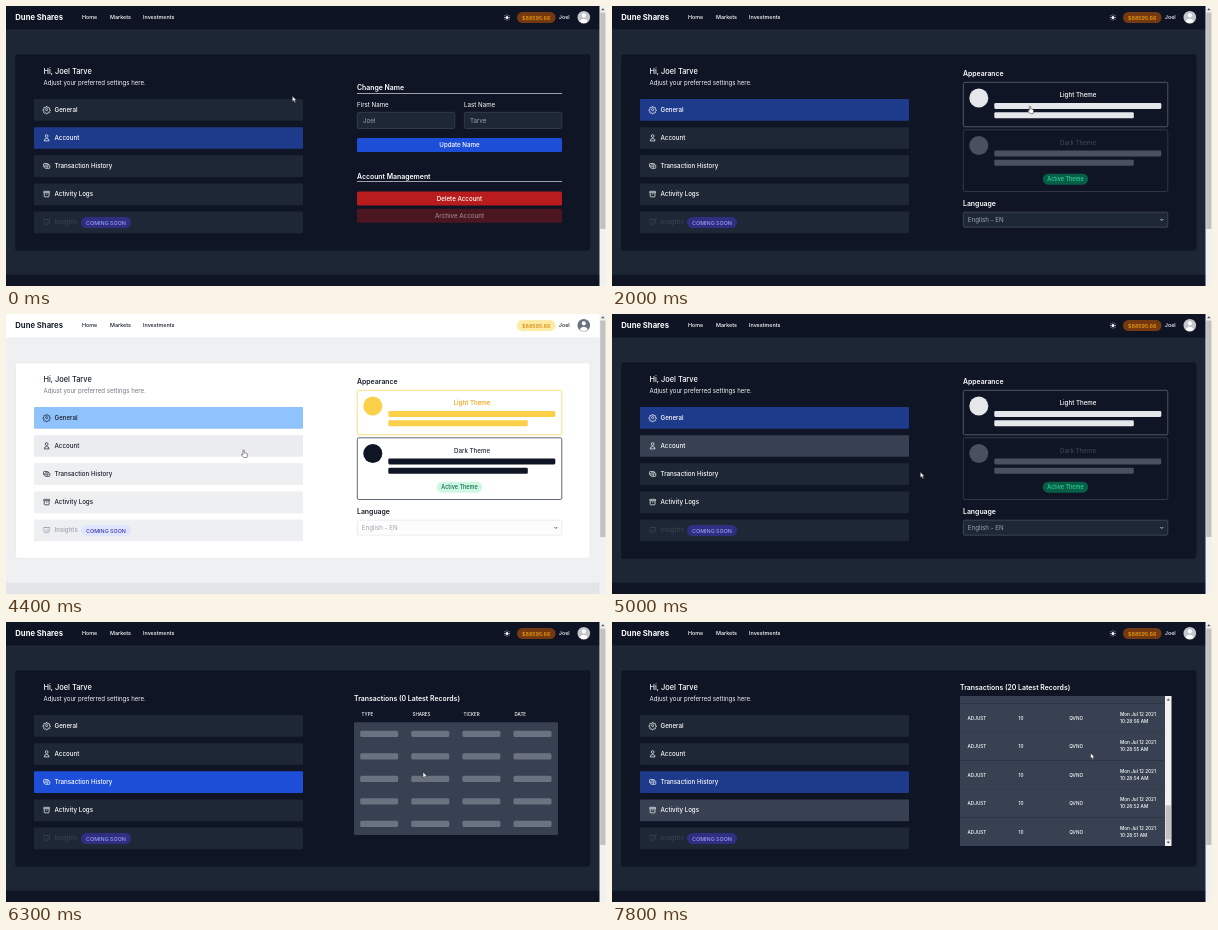
Write an HTML page that moves like this. It is 600 px wide and 280 px high and loops after 8000 ms.

```html
<!DOCTYPE html>
<html lang="en">
<head>
<meta charset="utf-8">
<title>Account settings</title>
<style>
  html, body { margin: 0; width: 100%; height: 100%; overflow: hidden; }
  svg { display: block; width: 600px; height: 280px; font-family: Inter, sans-serif; }
</style>
</head>
<body>
<svg id="stage" viewBox="0 0 600 280"></svg>
<script>
const LOOP = 8000;
const TO_GENERAL = 480, TO_HISTORY = 5480, LOADED = 6380;
const TO_LIGHT = 2600, TO_DARK = 4400, FADE = 400;

// Each entry: dark colour, light colour.
const palette = {
  page: ['#1d2635', '#eff0f2'], bar: ['#0e1423', '#ffffff'], panel: ['#0f1524', '#ffffff'],
  edge: ['#0f1524', '#e3e5e8'], foot: ['#0f1524', '#e2e4e8'],
  text: ['#ffffff', '#161d2b'], sub: ['#f3f4f6', '#737984'], faint: ['#374151', '#9ca3af'],
  row: ['#1e2735', '#eeeff1'], rowHover: ['#374151', '#e5e7eb'],
  active: ['#1e3a8a', '#90c2fb'], activeHover: ['#1d4ed8', '#60a5fa'],
  cash: ['#74390f', '#fdeaa5'], cashText: ['#f8a50c', '#d98206'], avatar: ['#c3c6cb', '#6b7280'],
  soon: ['#302e81', '#dfe5fe'], soonText: ['#939df6', '#3f3ba8'],
  sun: ['#e5e7eb', '#e9ebee'], sunText: ['#ffffff', '#eda313'], sunEdge: ['#6b7280', '#fcd34d'],
  sunFill: ['#e5e7eb', '#fcd049'],
  moonText: ['#3b4250', '#1f2937'], moonFill: ['#4a505e', '#101525'], moonEdge: ['#3f4655', '#1f2937'],
  badge: ['#065f46', '#cff8e3'], badgeText: ['#34d399', '#0b654b'],
  field: ['#1e2735', '#fdfdfd'], fieldEdge: ['#4b5563', '#e5e7eb'], hint: ['#9ca3af', '#9ca3af']
};

const rect = (x, y, w, h, fill, r = 0, more = '') =>
  `<rect x="${x}" y="${y}" width="${w}" height="${h}" rx="${r}" fill="${fill}" ${more}/>`;
const text = (x, y, s, size = 6.2, fill = 'var(--text)', weight = 400, more = '') =>
  `<text x="${x}" y="${y}" font-size="${size}" font-weight="${weight}" fill="${fill}" ${more}>${s}</text>`;
const mid = (x, y, s, size, fill, weight = 500) => text(x, y, s, size, fill, weight, 'text-anchor="middle"');
const heading = (x, y, s) => text(x, y, s, 6.9, 'var(--text)', 600);
const group = (id, body) => `<g id="${id}">${body}</g>`;
const stroke = (color, width = .7) => `stroke="${color}" stroke-width="${width}"`;
const times = (n, f) => Array.from({ length: n }, (_, i) => f(i)).join('');

const columns = ['TYPE', 'SHARES', 'TICKER', 'DATE'];
const columnHeads = y => columns.map((c, i) => text(355.5 + 51 * i, y, c, 4.5, 'var(--text)', 500)).join('');

const rows = [
  ['General', 'M9 12a3 3 0 106 0 3 3 0 10-6 0M10.5 3h3l.7 2.6 2.3 1 2.4-1.4 2 2.1-1.3 2.4.9 2.3 2.5.7v2l-2.5.8-1 2.2 1.4 2.4-2.1 2-2.4-1.3-2.2.9-.8 2.3h-2.8l-.8-2.4-2.2-.9-2.4 1.3-2.1-2 1.4-2.4-1-2.2L1 14.700v-2l2.600-.7.9-2.300-1.300-2.400 2-2.100 2.400 1.400 2.300-1z'],
  ['Account', 'M16 7a4 4 0 11-8 0 4 4 0 018 0zM12 14a7 7 0 00-7 7h14a7 7 0 00-7-7z'],
  ['Transaction History', 'M17 9V7a2 2 0 00-2-2H5a2 2 0 00-2 2v6a2 2 0 002 2h2m2 4h10a2 2 0 002-2v-6a2 2 0 00-2-2H9a2 2 0 00-2 2v6a2 2 0 002 2zm7-5a2 2 0 11-4 0 2 2 0 014 0z'],
  ['Activity Logs', 'M5 8h14M5 8a2 2 0 110-4h14a2 2 0 110 4M5 8v10a2 2 0 002 2h10a2 2 0 002-2V8m-9 4h4'],
  ['Insights', 'M8 13v-1m4 1v-3m4 3V8M8 21l4-4 4 4M3 4h18M4 4h16v12a1 1 0 01-1 1H5a1 1 0 01-1-1V4z']
];

const menu = rows.map(([label, icon], i) => {
  const y = 93 + 28.15 * i, color = i < 4 ? 'var(--text)' : 'var(--faint)';
  return rect(28, y, 269, 21.7, 'var(--row)', 1, `id="row${i}"`) +
    `<path transform="translate(36.500 ${y + 6.5}) scale(.345)" d="${icon}" fill="none" ${stroke(color, 2)} stroke-linejoin="round"/>` +
    text(48.5, y + 12.8, label, 6.2, color, 500);
}).join('') + rect(75, 211, 50, 11, 'var(--soon)', 5.5) + mid(100, 218.5, 'COMING SOON', 5.4, 'var(--soonText)');

const header = rect(0, 0, 594, 23.5, 'var(--bar)') +
  text(9.3, 14.2, 'Dune Shares', 7.7, 'var(--text)', 700) +
  [[76, 'Home'], [104, 'Markets'], [137, 'Investments']].map(([x, s]) => text(x, 13.4, s, 5.4, 'var(--text)', 500)).join('') +
  group('sunIcon', '<circle cx="501" cy="11.5" r="1.5" fill="#fff"/>' +
    times(8, i => `<path d="M501 8.500v.9" ${stroke('#fff')} transform="rotate(${45 * i} 501 11.500)"/>`)) +
  group('moonIcon', '<path d="M503.600 12.500a2.900 2.900 0 01-3.600-3.600 2.900 2.900 0 103.600 3.600z" fill="#1f2937"/>') +
  rect(511, 6, 38.5, 11, 'var(--cash)', 5.5) + mid(530.2, 13.5, '$88595.66', 5.4, 'var(--cashText)') +
  text(552.8, 13.4, 'Joel', 5.4, 'var(--text)', 500) +
  '<circle cx="577.800" cy="11.300" r="6.300" fill="var(--avatar)"/>' +
  '<path d="M575.700 9.300a2.100 2.100 0 104.200 0a2.100 2.100 0 10-4.200 0M573.700 15.200a4.600 4.600 0 018.200 0a5 5 0 01-8.200 0" fill="#fff"/>';

const rule = y => rect(351, y, 205, .6, 'var(--text)');
const button = (y, s, fill, color) => rect(351, y, 205, 14, fill, 1.5) + mid(453.5, y + 9.1, s, 6.2, color);
const input = (x, label, value) => text(x, 100.7, label) +
  rect(x + .3, 106.3, 97.5, 16.2, 'var(--field)', 1.5, stroke('#3b4555')) + text(x + 6, 116.7, value, 6.2, 'var(--hint)');
const accountPage = heading(351, 84.3, 'Change Name') + rule(87.2) +
  input(351, 'First Name', 'Joel') + input(458, 'Last Name', 'Tarve') +
  button(132, 'Update Name', '#1d4ed8', '#fff') +
  heading(351, 172.5, 'Account Management') + rule(175.4) +
  button(185.6, 'Delete Account', '#b91c1c', '#fff') + button(202.8, 'Archive Account', '#4c1620', '#99858c');

const card = (name, kind, y, h) =>
  rect(351.3, y, 204.5, h, 'none', 1.5, `id="${kind}Box" ${stroke(`var(--${kind}Edge)`)}`) +
  `<circle cx="366.800" cy="${y + 15.7}" r="9.500" fill="var(--${kind}Fill)"/>` +
  mid(466, y + 15, name, 6.2, `var(--${kind}Text)`) +
  rect(382.3, y + 20.6, 167, 6, `var(--${kind}Fill)`, 1.3) + rect(382.3, y + 29.9, 139.5, 6, `var(--${kind}Fill)`, 1.3);
const generalPage = heading(351, 70.3, 'Appearance') + card('Light Theme', 'sun', 76.3, 44.5) +
  group('darkCard', card('Dark Theme', 'moon', 123.8, 61.700)) +
  group('badgeBox', rect(430.7, 167.7, 45.5, 11, 'var(--badge)', 5.5) + mid(453.5, 175.2, 'Active Theme', 5.5, 'var(--badgeText)')) +
  heading(351, 200, 'Language') +
  rect(351.3, 206.2, 204.5, 15, 'var(--field)', 1.5, stroke('var(--fieldEdge)')) +
  text(355.8, 216, 'English - EN', 6.2, 'var(--hint)') +
  `<path d="M548.300 213l1.500 1.500 1.500-1.500" fill="none" ${stroke('var(--text)')}/>`;

const skeletonPage = heading(348, 78.500, 'Transactions (0 Latest Records)') + columnHeads(94) +
  rect(348, 100.3, 204, 112.7, '#374151', 1) +
  times(20, i => rect(354.2 + 51.1 * (i % 4), 108.7 + 22.5 * (i / 4 | 0), 38, 6.4, '#6b7280', 1.6));

const ROW = 28.5, HEAD = 16, VIEW = 150, MAX_SCROLL = 20 * ROW + HEAD - VIEW;
const record = i => {
  const y = 74 + HEAD + ROW * i, sec = 51 + Math.round((19 - i) * 1.3);
  const time = `10:${28 + (sec / 60 | 0)}:${String(sec % 60).padStart(2, '0')} AM`;
  const cell = (x, dy, s) => text(x, y + dy, s, 4.7, '#fff', 500);
  return rect(348, y, 205, ROW, '#374151') + rect(348, y, 205, .5, '#2c3645') +
    cell(355.5, 16, 'ADJUST') + cell(406.5, 16, '10') + cell(457.2, 16, 'QVNO') +
    cell(508, 12.4, 'Mon Jul 12 2021') + cell(508, 19.2, time);
};
const historyPage = heading(348, 67.5, 'Transactions (20 Latest Records)') +
  '<clipPath id="view"><rect x="348" y="74" width="205" height="150"/></clipPath>' +
  `<g clip-path="url(#view)">${group('records', columnHeads(84) + times(20, record))}</g>` +
  rect(553, 74, 6.5, 150, '#f1f1f1') + rect(553.600, 80, 5.3, 34, '#c1c1c1', 0, 'id="thumb"') +
  '<path d="M554.600 78.500l1.700-2 1.700 2zM554.600 219.500l1.700 2 1.700-2z" fill="#505050"/>';

const $ = id => document.getElementById(id);
$('stage').innerHTML = rect(0, 0, 600, 280, 'var(--page)') + header +
  rect(9.5, 48.8, 574.5, 195.5, 'var(--panel)', 2, stroke('var(--edge)', .6)) + rect(0, 268.7, 594, 12, 'var(--foot)') +
  text(37.5, 67.7, 'Hi, Joel Tarve', 7.4, 'var(--text)', 500) +
  text(37.5, 79.2, 'Adjust your preferred settings here.', 6.1, 'var(--sub)') + menu +
  group('account', accountPage) + group('general', generalPage) +
  group('skeleton', skeletonPage) + group('history', historyPage) +
  rect(593.5, 0, 6.5, 280, '#f1f1f1') + rect(594.2, 6.5, 5.2, 216.5, '#c1c1c1') +
  '<path d="M595 4.300l1.800-2 1.800 2z" fill="#505050"/>' +
  group('pointer', '<path id="arrow" d="M0 0v5.800l1.400-1.200 1 2.200 1-.5-1-2.100h1.800z"/>' +
    '<path id="hand" d="M-.7 4.500V.5a.7.7 0 011.300 0v2.300l2.400.6q.8.300.7 1.200l-.5 3h-3.100l-2.300-2.700q-.1-.9.700-.7z"/>');
$('pointer').setAttribute('style', 'fill:#fff;stroke:#111;stroke-width:.45');

// Pointer tip: time, x, y.
const path = [
  [0, 286.3, 90], [50, 286.3, 90], [300, 244.500, 107], [1050, 244.500, 107], [1500, 440, 95], [1750, 440, 95],
  [2000, 418, 100], [3250, 418, 100], [3800, 440, 153], [3950, 440, 153], [4400, 237.7, 136], [4800, 237.7, 136],
  [5000, 308.3, 158], [5300, 284, 159], [6200, 284, 159], [6300, 417, 150], [6500, 480, 150], [7000, 480, 150],
  [7200, 296.5, 163.5], [7400, 262, 186], [7600, 262, 186], [7800, 478.5, 131], [8000, 478.5, 131]
];
// Hover spans: row, from, to.
const hovers = [[0, 400, 1150], [1, 4350, 5010], [2, 5150, 6310], [3, 7300, 7810]];
const activeSpans = [[TO_GENERAL, TO_HISTORY], [-200, TO_GENERAL], [TO_HISTORY, LOOP + 200]];

const clamp = v => Math.max(0, Math.min(1, v));
const ramp = (t, from, span) => clamp((t - from) / span);
const smooth = p => p * p * (3 - 2 * p);
const span = (t, from, to, fade) => ramp(t, from, fade) * (1 - ramp(t, to, fade));
const channels = c => [1, 3, 5].map(i => parseInt(c.slice(i, i + 2), 16));
const mix = (a, b, p) => a.map((v, i) => v + (b[i] - v) * p);
const rgb = c => `rgb(${c.map(Math.round)})`;
const show = (id, on) => { $(id).style.display = on ? '' : 'none'; };
const move = (id, x, y) => $(id).setAttribute('transform', `translate(${x} ${y})`);
const pairs = Object.entries(palette).map(([name, pair]) => [name, pair.map(channels)]);

function draw(t) {
  const fade = smooth(ramp(t, TO_LIGHT, FADE)) - smooth(ramp(t, TO_DARK, FADE));
  const now = {};
  for (const [name, [dark, light]] of pairs) {
    now[name] = mix(dark, light, fade);
    $('stage').style.setProperty('--' + name, rgb(now[name]));
  }

  const general = t >= TO_GENERAL && t < TO_HISTORY;
  show('account', t < TO_GENERAL);
  show('general', general);
  show('skeleton', t >= TO_HISTORY && t < LOADED);
  show('history', t >= LOADED);

  const light = t >= TO_LIGHT - 20 && t < TO_DARK - 20;
  show('sunIcon', !light);
  show('moonIcon', light);
  $('sunBox').setAttribute('height', light ? 61.7 : 44.5);
  $('moonBox').setAttribute('height', light ? 44.5 : 61.7);
  move('darkCard', 0, light ? 17.2 : 0);
  move('badgeBox', 0, light ? -47.5 : 0);

  rows.forEach((_, i) => {
    const hover = hovers[i] ? span(t, hovers[i][1], hovers[i][2], 150) : 0;
    const active = activeSpans[i] ? span(t, ...activeSpans[i], 100) : 0;
    $('row' + i).setAttribute('fill', rgb(mix(mix(now.row, now.rowHover, hover), mix(now.active, now.activeHover, hover), active)));
  });

  const scroll = 1 - (1 - ramp(t, 6600, 870)) ** 2;
  move('records', 0, -MAX_SCROLL * scroll);
  move('thumb', 0, 103.5 * scroll);

  const k = Math.max(1, path.findIndex(p => p[0] > t));
  const [x, y] = mix(path[k - 1], path[k], smooth(ramp(t, path[k - 1][0], path[k][0] - path[k - 1][0]))).slice(1);
  const onLink = (x > 28 && x < 296 && y > 93 && y < 205) || (general && x > 351 && y > 76 && y < 186);
  move('pointer', x, y);
  show('hand', onLink);
  show('arrow', !onLink);
}

let start;
function tick(time) {
  start ??= time;
  draw((time - start) % LOOP);
  requestAnimationFrame(tick);
}
draw(0);
requestAnimationFrame(tick);
</script>
</body>
</html>
```
